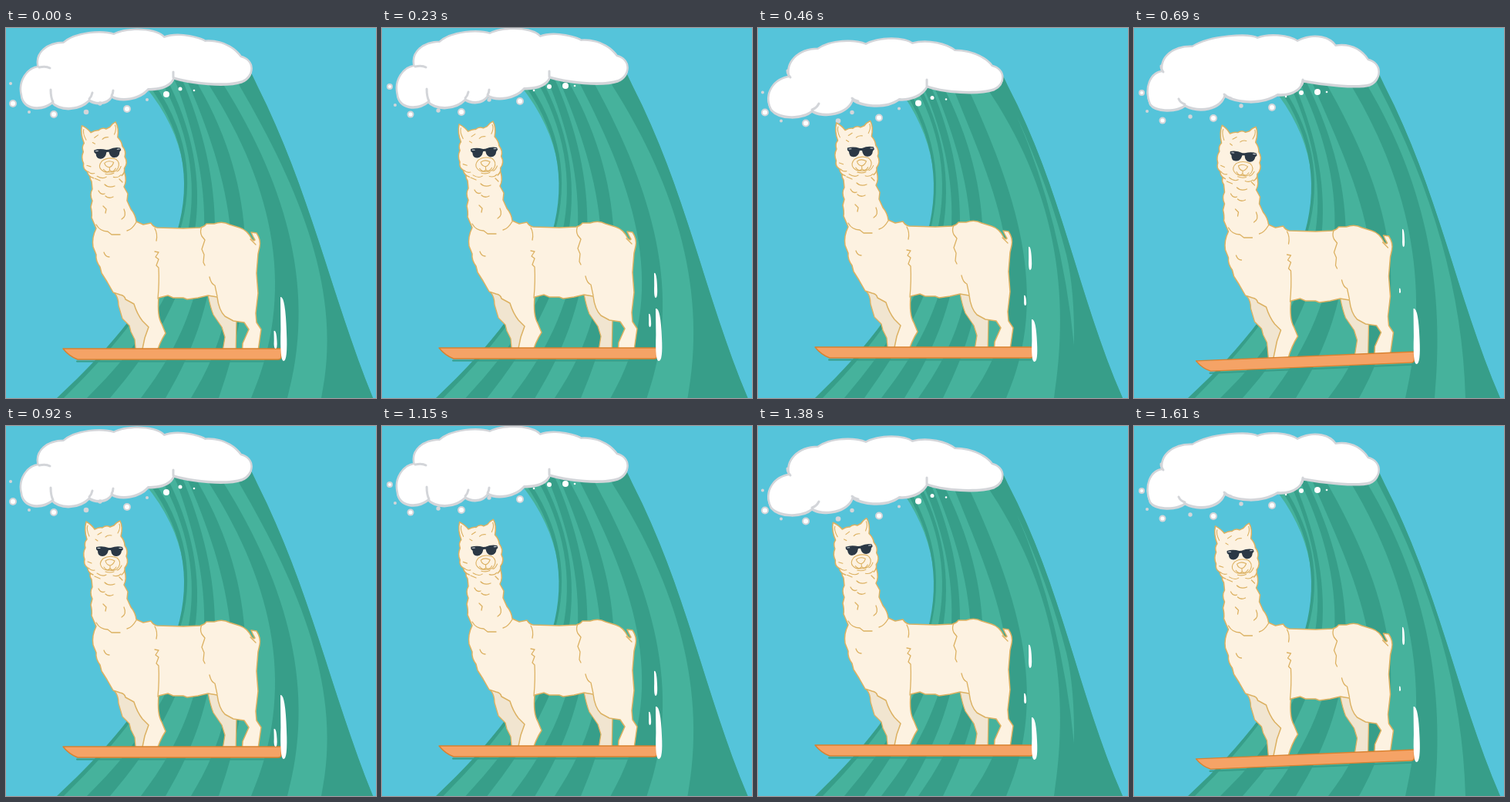
Animation, 480 px wide and 480 px high, one loop 1840 ms. Source, as an HTML page with a canvas:

```html
<!DOCTYPE html>
<html lang="en">
<head>
<meta charset="utf-8">
<title>Surfing alpaca</title>
<style>
html, body { margin: 0; height: 100%; overflow: hidden; background: #55c4da; }
canvas { display: block; width: 100vw; height: 100vh; }
</style>
</head>
<body>
<canvas width="480" height="480"></canvas>
<script>
const ctx = document.querySelector('canvas').getContext('2d');
const STEP = 230;
const SKY = '#55c4da', LIGHT = '#46b29c', DARK = '#379e89', FOAM = '#d3d5d9';
const WOOL = '#fdf2e1', SHADE = '#f1e5d0', LINE = '#dcb162', BLACK = '#2b3845';

// Wave edges and stripe borders are x positions at y = 75, 210, 345, 480.
const waves = [
  { left: [180, 232, 185, 68], right: [326, 383, 428, 476], stripes: [
    [[186, 231, 184, 66], [194, 235, 188, 75]],
    [[205, 241, 208, 105], [213, 248, 222, 135]],
    [[222, 255, 245, 175], [232, 268, 262, 207]],
    [[238, 283, 290, 240], [250, 302, 308, 276]],
    [[264, 329, 349, 318], [283, 350, 379, 365]],
    [[303, 372, 412, 409], [326, 383, 428, 476]]] },
  null,
  { left: [180, 229, 187, 76], right: [324, 381, 424, 473], stripes: [
    [[186, 228, 186, 74], [192, 231, 190, 84]],
    [[204, 239, 204, 112], [210, 244, 216, 138]],
    [[214, 250, 235, 160], [224, 260, 250, 190]],
    [[228, 270, 270, 208], [240, 286, 286, 240]],
    [[252, 304, 325, 275], [271, 325, 349, 322]],
    [[295, 364, 391, 384], [324, 381, 424, 473]]] },
  { left: [178, 231, 187, 72], right: [325, 382, 426, 475], stripes: [
    [[186, 230, 186, 70], [192, 234, 190, 79]],
    [[203, 238, 212, 112], [209, 244, 226, 141]],
    [[217, 258, 247, 175], [226, 270, 267, 210]],
    [[233, 288, 308, 252], [251, 313, 333, 292]],
    [[282, 343, 366, 352], [303, 364, 391, 390]],
    [[317, 377, 415, 430], [325, 382, 426, 475]]] }
];
const mean = (a, b) => a.map((v, i) => (v + b[i]) / 2);
const [w0, , w2] = waves;
waves[1] = {
  left: mean(w0.left, w2.left), right: mean(w0.right, w2.right),
  stripes: w0.stripes.map((s, i) => s.map((e, j) => mean(e, w2.stripes[i][j])))
};

const clouds = [
  'M43 51C38 32 55 20 75 20C90 6 125 4 140 9C158 0 195 1 205 13C225 5 255 15 258 18C285 16 300 32 304 38C322 42 321 62 306 68C285 75 240 70 217 63C214 74 200 78 184 78C172 92 148 94 137 87C130 99 115 97 108 92C95 106 70 106 60 95C45 107 22 104 21 86C17 70 28 52 43 51Z',
  'M42 64C36 46 52 28 78 28C95 16 125 16 140 22C158 12 190 13 200 21C220 15 245 22 255 30C280 30 298 42 303 50C320 54 320 72 306 78C285 85 240 82 219 74C212 88 195 92 183 91C165 104 135 100 122 91C118 110 85 116 70 106C58 117 28 117 18 105C8 85 22 66 42 64Z',
  'M38 57C34 38 52 24 76 25C100 10 150 8 160 14C175 8 200 10 212 18C235 6 255 14 261 24C285 20 298 34 303 42C321 46 320 66 306 72C290 77 245 72 219 67C215 82 200 86 186 85C165 98 135 96 117 86C112 104 85 109 66 99C55 108 28 107 22 98C14 78 22 58 38 57Z'
].map(d => new Path2D(d));
const curls = [
  'M58 80Q58 90 61 96M108 92Q111 89 112 84M137 88Q139 84 139 81M217 64V57M43 51Q52 49 57 52',
  'M70 106Q76 104 79 98M122 91Q125 94 130 95M219 75V67M42 64Q38 60 38 55',
  'M66 99Q60 97 58 92M117 86Q121 90 126 91M219 67Q219 70 217 74M38 57Q35 54 35 49'
].map(d => new Path2D(d));

const dropsA = [[9, 98, 5], [6, 72, 2], [30, 109, 2], [62, 112, 5], [104, 109, 3.3], [122, 98, 2.7],
  [157, 105, 5], [183, 93, 2], [208, 86, 4], [226, 79, 2.5], [244, 81, 1.3]];
const dropsB = [[10, 84, 4], [17, 108, 2], [37, 120, 4.5], [73, 115, 2.7], [103, 117, 5], [139, 101, 2.7],
  [179, 103, 5], [197, 89, 1.3], [217, 84, 3], [238, 83, 4], [250, 83, 1.3]];

// Each phase: cloud shape and shift, drops and their rise, body shift, spray lenses [x, top, bottom, width].
const phases = [
  { cloud: 0, lift: 0, drops: dropsA, fall: 0, body: [0, 0], spray: [[360, 349, 432, 8], [349.5, 393, 416, 4]] },
  { cloud: 0, lift: -1, drops: dropsB, fall: -8, body: [0, -1], spray: [[359, 364, 432, 8], [355, 318, 350, 4], [347.5, 371, 388, 3]] },
  { cloud: 1, lift: 0, drops: dropsA, fall: 11.5, body: [0, -2], spray: [[358.5, 378, 433, 7], [353, 284, 314, 4], [346.5, 347, 360, 3]] },
  { cloud: 2, lift: 0, drops: dropsB, fall: 0, body: [5.5, 4], spray: [[366.5, 364, 436, 8], [349.5, 261, 284, 3], [345, 338, 344, 2]] }
];
const nods = [-5, -3.5, -2, 4, 0, -3, -6, -3.5];

const farLegs = new Path2D('M141 344Q146 350 146 360L151 377L160 386L162 394L167 404L169 426H178L180 404L187 388L178 346ZM262 346Q265 362 269 372L280 388L284 401L280 426H298L299 380L280 346Z');
const body = new Path2D('M111 188Q107 194 111 199L112 209Q108 216 112 224L110 232Q112 240 111 246L117 260Q111 272 113 284L117 294Q116 302 122 310L124 318L131 329L139 343L148 346Q154 347 155 352L166 358Q170 371 177 380L185 388L180 402L175 426H194Q199 408 207 396L202 384Q196 374 198 350L210 347L217 350L230 350L235 352L249 350L262 347L274 349Q276 366 284 374L295 380L309 382L315 391L307 409L306 426H326L331 391L325 382L324 370L327 344L325 318L327 293L329 284Q331 275 325 266L318 265Q320 270 323 275Q322 277 319 274Q313 262 303 259L290 255Q281 250 270 254L260 254Q257 258 252 259L230 260L196 259Q191 258 188 253L178 255L169 251Q168 242 162 235L157 224L158 215L153 206Q157 199 154 188');
const bodyLines = new Path2D('M117 255Q122 264 132 264L137 268L148 268M157 263Q163 262 169 252M193 260Q197 267 195 276M193 290L198 291L194 297L198 300L195 308L198 311Q199 330 197 351M254 258Q251 264 254 270L258 275L254 287L257 294L256 304L258 308M264 323Q266 332 271 334L274 348M127 291Q129 297 134 297M120 211Q123 217 128 215M129 218Q133 222 139 219M126 231L130 235L129 240M153 235Q157 244 150 248M128 203Q133 208 141 205M147 196L151 200M115 195L122 198M317 274L324 281');
const head = new Path2D('M113 193Q106 190 106 184Q100 180 102 173Q99 165 103 158Q101 151 105 147Q101 135 104 124Q111 128 115 134Q121 131 125 132Q130 128 135 131L140 129Q143 125 148 123Q152 131 149 143Q154 149 154 155Q159 162 156 169Q160 177 154 184Q155 189 150 193');
const headLines = new Path2D('M108 143Q104 134 106 129M145 139Q149 132 147 127M119 141L124 138M129 144Q132 141 137 142M116 147L119 149M106 176L111 178M107 184Q110 188 115 187M150 181Q147 187 144 187M118 191Q125 196 130 193M139 194Q145 196 149 192M126 172Q120 178 124 183Q128 188 134 187Q142 189 146 183Q150 176 144 171Q134 167 126 172M129 175Q134 171 141 175Q139 180 135 181Q130 180 129 175M135 181V185Q131 189 127 183M135 185Q139 189 143 183M129 189Q135 191 140 189');
const glasses = new Path2D('M117 157Q125 155 133 158H136Q144 155 151 157L152 160L150 162Q149 169 143 169Q137 169 136 161H133Q131 169 125 169Q119 169 119 162L117 160Z');
const board = new Path2D('M74 416H357V426Q357 430 353 430H93Q82 426 74 416Z');

function fill(path, color) {
  ctx.fillStyle = color;
  ctx.fill(path);
}

function stroke(path, color, width) {
  ctx.strokeStyle = color;
  ctx.lineWidth = width;
  ctx.stroke(path);
}

function band(a, b) {
  const p = new Path2D();
  const c1 = k => (-5 * k[0] + 18 * k[1] - 9 * k[2] + 2 * k[3]) / 6;
  const c2 = k => (2 * k[0] - 9 * k[1] + 18 * k[2] - 5 * k[3]) / 6;
  p.moveTo(a[0] - 9, 56);
  p.lineTo(a[0], 75);
  p.bezierCurveTo(c1(a), 210, c2(a), 345, a[3], 480);
  p.lineTo(b[3], 480);
  p.bezierCurveTo(c2(b), 345, c1(b), 210, b[0], 75);
  p.lineTo(b[0] - 9, 56);
  return p;
}

function disc(x, y, r, color) {
  ctx.fillStyle = color;
  ctx.beginPath();
  ctx.arc(x, y, r, 0, 7);
  ctx.fill();
}

function drawWave(n) {
  const w = waves[n];
  fill(band(w.left, w.right), LIGHT);
  for (const [a, b] of w.stripes) fill(band(a, b), DARK);
  if (n === 2) fill(new Path2D('M336 115Q394 250 410 412Q411 340 400 294Q378 208 336 115'), LIGHT);
}

function drawCloud({ cloud, lift, drops, fall }) {
  ctx.save();
  ctx.translate(0, lift);
  stroke(clouds[cloud], FOAM, 5);
  ctx.translate(0, 1.5);
  stroke(clouds[cloud], FOAM, 4);
  ctx.translate(0, -1.5);
  fill(clouds[cloud], '#fff');
  stroke(curls[cloud], FOAM, 3);
  ctx.restore();
  for (const [x, y, r] of drops) {
    const onWave = x > 190;
    disc(x, y + fall, r, onWave ? '#fff' : FOAM);
    if (!onWave && r > 3.5) disc(x, y + fall, r - 2, '#fff');
  }
}

function drawSpray([x, top, bottom, w]) {
  const p = new Path2D();
  p.moveTo(x - w / 2, top);
  p.quadraticCurveTo(x + w * .3, top - 2, x + w / 2, top + (bottom - top) * .55);
  p.quadraticCurveTo(x + w * .7, bottom, x, bottom);
  p.quadraticCurveTo(x - w * .6, bottom, x - w * .45, (top + bottom) / 2);
  fill(p, '#fff');
}

function drawAlpaca(dx, dy, nod) {
  ctx.save();
  ctx.translate(dx, dy);
  fill(farLegs, SHADE);
  stroke(farLegs, LINE, 1.3);
  fill(body, WOOL);
  stroke(body, LINE, 1.5);
  stroke(bodyLines, LINE, 1.3);
  ctx.translate(132, 190);
  ctx.rotate(nod * Math.PI / 180);
  ctx.translate(-132, -190);
  fill(head, WOOL);
  stroke(head, LINE, 1.5);
  stroke(headLines, LINE, 1.1);
  fill(glasses, BLACK);
  stroke(new Path2D('M119 158.5L122 158.5M147 158.5L150 158.5'), '#d9dde0', 1);
  ctx.restore();
}

function drawBoard(n, dy) {
  ctx.save();
  if (n === 3) ctx.transform(1, -.042, 0, 1, 6.5, 19);
  else ctx.translate(0, dy);
  stroke(new Path2D('M92 432.5H354'), DARK, 2);
  fill(board, '#f5a366');
  stroke(board, '#d9812f', 1.4);
  ctx.restore();
}

function draw(now) {
  const i = Math.floor(now / STEP) % 8, n = i % 4, phase = phases[n];
  const [dx, dy] = phase.body;
  ctx.fillStyle = SKY;
  ctx.fillRect(0, 0, 480, 480);
  drawWave(n);
  drawCloud(phase);
  drawAlpaca(dx, dy, nods[i]);
  drawBoard(n, dy);
  phase.spray.forEach(drawSpray);
}

ctx.lineCap = ctx.lineJoin = 'round';
const start = performance.now();
function tick() {
  draw(performance.now() - start);
  requestAnimationFrame(tick);
}
tick();
</script>
</body>
</html>
```
